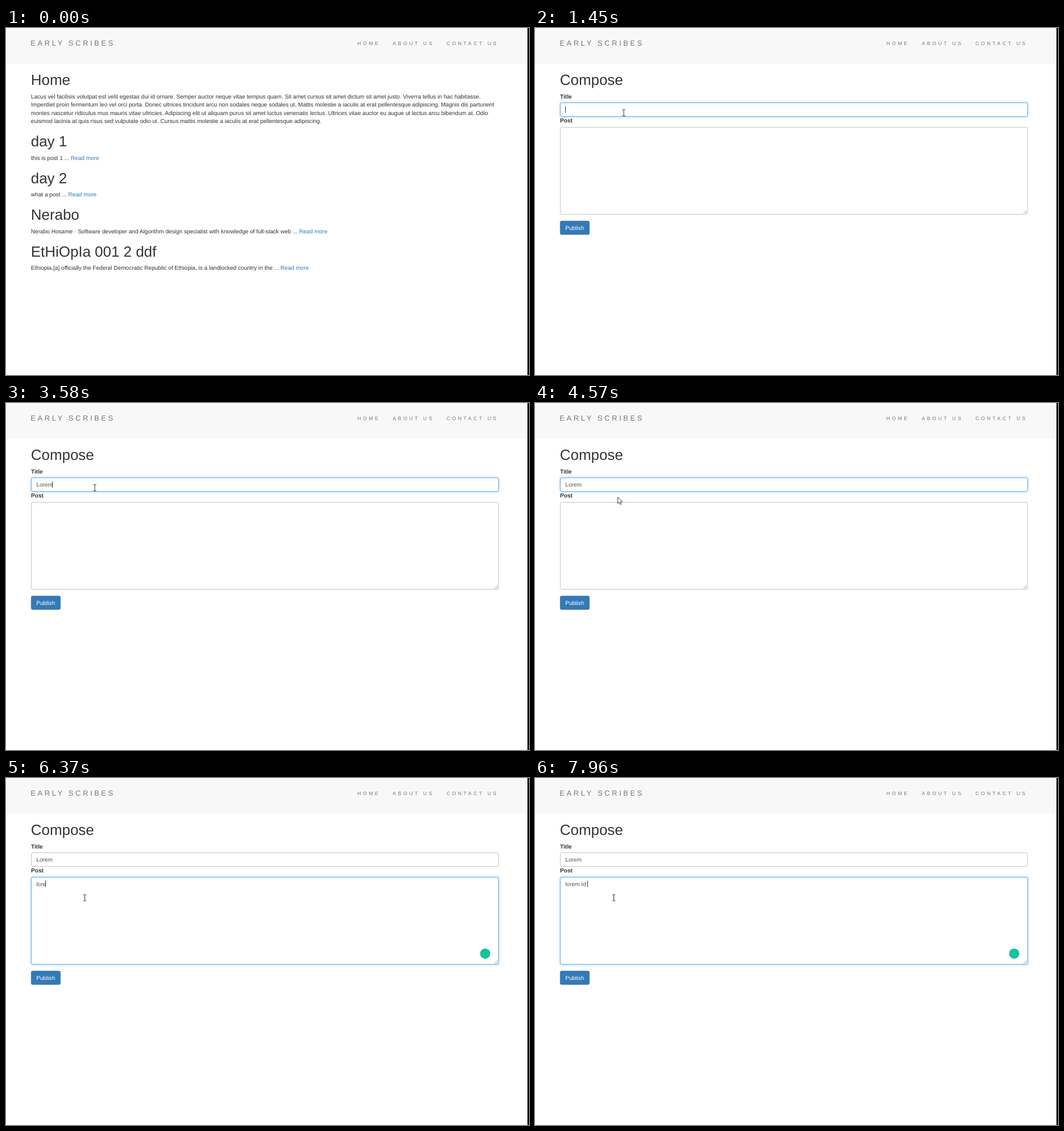
An HTML page for the animation above (8 s loop, 919 by 610 pixels).

```html
<!DOCTYPE html>
<html lang="en">
<head>
<meta charset="utf-8">
<title>Journal compose</title>
<style>
  html, body { margin: 0; width: 100%; height: 100%; overflow: hidden; background: #fff; }
  svg { display: block; width: 100%; height: 100%; }
  text {
    font-family: "Liberation Sans", Arial, sans-serif;
    font-size: 10.08px;
    fill: #333;
    white-space: pre;
    text-rendering: geometricPrecision;
  }
  .brand { font-size: 12.96px; letter-spacing: 3.6px; fill: #777; }
  .nav { font-size: 8.64px; letter-spacing: 3.6px; fill: #777; }
  .h1 { font-size: 25.92px; }
  .label { font-weight: bold; }
  .link { fill: #337ab7; }
  .value { fill: #555; }
  .field { fill: #fff; stroke: #c6c6c6; }
  .focus { fill: #fff; stroke: #66afe9; filter: drop-shadow(0 0 2.9px rgba(102, 175, 233, .6)); }
  .grip { stroke: #777; stroke-width: .8; }
  .popup rect { fill: #fff; filter: drop-shadow(0 1px 1.3px rgba(0, 0, 0, .32)); }
  .popup text { font-family: "Open Sans", "Noto Sans", sans-serif; font-size: 8.95px; }
</style>
</head>
<body>
<svg id="stage" viewBox="0 0 919 610">
  <rect width="919" height="610" fill="#fff"/>
  <rect width="916" height="62.6" fill="#f8f8f8"/>
  <text class="brand" x="43.3" y="31.1">EARLY SCRIBES</text>
  <text class="nav" x="617.4" y="29.7">HOME</text>
  <text class="nav" x="679.5" y="29.7">ABOUT US</text>
  <text class="nav" x="773.9" y="29.7">CONTACT US</text>

  <g id="home"></g>

  <g id="compose">
    <text class="h1" x="43.8" y="100.4">Compose</text>
    <rect class="field" x="44.5" y="131.5" width="821" height="24" rx="2.5"/>
    <rect class="field" x="44.5" y="174.5" width="821" height="153" rx="2.5"/>
    <rect class="focus" id="titleGlow" x="44.5" y="131.5" width="821" height="24" rx="2.5"/>
    <rect class="focus" id="postGlow" x="44.5" y="174.5" width="821" height="153" rx="2.5"/>
    <text class="label" x="44" y="123.9">Title</text>
    <text class="label" x="44" y="166.4">Post</text>
    <path class="grip" d="M858.3 326.3l5.6-5.6M861.6 326.3l2.3-2.3"/>
    <text class="value" id="titleText" x="53.3" y="147.1"></text>
    <text class="value" id="postText" x="53.3" y="189.6"></text>
    <rect id="titleCaret" y="138" width="1" height="11" fill="#333"/>
    <rect id="postCaret" y="180.5" width="1" height="11" fill="#333"/>
    <circle id="badge" cx="842" cy="308.7" r="9" fill="#15c39a"/>
    <rect x="44.3" y="339.3" width="51.2" height="23.8" rx="2.6" fill="#337ab7" stroke="#2e6da4" stroke-width=".72"/>
    <text x="53.2" y="354.9" fill="#fff" style="fill:#fff">Publish</text>
    <g class="popup" id="popup"><rect x="115" y="162" width="61" height="162" rx="1.5"/></g>
  </g>

  <path id="arrow" d="M0 0V11.4L2.6 9 4.4 13 6.1 12.2 4.4 8.4H8Z" fill="#fff" stroke="#111" stroke-width=".8"/>
  <path id="beam" d="M-2.6-5.4H-.7L0-4.8 .7-5.4H2.6M0-4.8V4.8M-2.6 5.4H-.7L0 4.8 .7 5.4H2.6" fill="none" stroke="#222" stroke-width=".95"/>
  <rect x="916.3" width="2.7" height="610" fill="#000"/>
</svg>
<script>
const LOOP = 8000, BLINK = 530;
const $ = id => document.getElementById(id);

function addText(parent, cls, x, y, str) {
  const el = document.createElementNS("http://www.w3.org/2000/svg", "text");
  el.setAttribute("class", cls);
  el.setAttribute("x", x);
  el.setAttribute("y", y);
  el.textContent = str;
  parent.appendChild(el);
  return el;
}

const intro = [
  "Lacus vel facilisis volutpat est velit egestas dui id ornare. Semper auctor neque vitae tempus quam. Sit amet cursus sit amet dictum sit amet justo. Viverra tellus in hac habitasse.",
  "Imperdiet proin fermentum leo vel orci porta. Donec ultrices tincidunt arcu non sodales neque sodales ut. Mattis molestie a iaculis at erat pellentesque adipiscing. Magnis dis parturient",
  "montes nascetur ridiculus mus mauris vitae ultricies. Adipiscing elit ut aliquam purus sit amet luctus venenatis lectus. Ultrices vitae auctor eu augue ut lectus arcu bibendum at. Odio",
  "euismod lacinia at quis risus sed vulputate odio ut. Cursus mattis molestie a iaculis at erat pellentesque adipiscing."
];
const posts = [
  ["day 1", "this is post 1"],
  ["day 2", "what a post"],
  ["Nerabo", "Nerabo Hosame · Software developer and Algorithm design specialist with knowledge of full-stack web"],
  ["EtHiOpIa 001 2 ddf", "Ethiopia,[a] officially the Federal Democratic Republic of Ethiopia, is a landlocked country in the"]
];

addText($("home"), "h1", 43.8, 100.4, "Home");
intro.forEach((line, i) => addText($("home"), "", 43.8, 123.9 + i * 14.4, line));
posts.forEach(([title, body], i) => {
  const y = 208.4 + i * 64.5;
  addText($("home"), "h1", 43.8, y, title);
  const line = addText($("home"), "", 43.8, y + 23.2, body + " ... ");
  const link = document.createElementNS(line.namespaceURI, "tspan");
  link.setAttribute("class", "link");
  link.textContent = "Read more";
  line.appendChild(link);
});
["day 1", "day 2", "Test", "post one", "one", "two"].forEach((s, i) =>
  addText($("popup"), "", 124, 181.7 + i * 26, s));

// Each entry restarts the caret blink and sets the field's text.
const titleKeys = [
  [1310, ""], [1840, ""], [2720, "L"], [2850, "Lo"],
  [3040, "Lor"], [3180, "Lore"], [3580, "Lorem"]
];
const postKeys = [
  [4840, ""], [6140, "l"], [6190, "lo"], [6300, "lor"], [6370, "lore"], [6630, "lorem"],
  [6900, "lorem "], [6960, "lorem I"], [7100, "lorem Id"], [7910, "lorem Id "]
];
const mouse = [
  [980, 152, 122], [1050, 152, 122], [1250, 156, 149], [4430, 156, 149],
  [4570, 145.5, 165.5], [4630, 145.5, 165.5], [4770, 138.5, 210.5]
];

const show = (id, on) => { $(id).style.display = on ? "" : "none"; };
const ramp = (t, start, span) => {
  const u = Math.min(1, Math.max(0, (t - start) / span));
  return u * u * (3 - 2 * u);
};

function drawField(name, keys, t, focused) {
  const last = keys.filter(k => k[0] <= t).pop();
  const text = $(name + "Text");
  const str = last ? last[1] : "";
  if (text.textContent !== str) text.textContent = str;
  const caretOn = focused && last && Math.floor((t - last[0]) / BLINK) % 2 === 0;
  show(name + "Caret", caretOn);
  if (caretOn) {
    const width = str ? text.getComputedTextLength() : 0;
    $(name + "Caret").setAttribute("x", Math.round(53 + width - .5));
  }
}

function mouseAt(t) {
  const i = mouse.findIndex(k => k[0] > t);
  if (i < 0) return mouse[mouse.length - 1].slice(1);
  const [t0, x0, y0] = mouse[i - 1], [t1, x1, y1] = mouse[i];
  const u = ramp(t, t0, t1 - t0);
  return [x0 + (x1 - x0) * u, y0 + (y1 - y0) * u];
}

function drawMouse(t) {
  const visible = t >= mouse[0][0];
  const [x, y] = visible ? mouseAt(t) : [0, 0];
  const overText = (y > 131 && y < 156) || y > 174;
  show("arrow", visible && !overText);
  show("beam", visible && overText);
  $(overText ? "beam" : "arrow").setAttribute("transform", `translate(${x} ${y})`);
}

function draw(t) {
  show("home", t < 580);
  show("compose", t >= 580);
  $("titleGlow").style.opacity = ramp(t, 1290, 150) - ramp(t, 4700, 140);
  $("postGlow").style.opacity = ramp(t, 4700, 140);
  drawField("title", titleKeys, t, t < 4700);
  drawField("post", postKeys, t, true);
  show("popup", t >= 1840 && t < 2785);
  $("badge").setAttribute("r", 9 * ramp(t, 5400, 150));
  drawMouse(t);
}

const start = performance.now();
function tick() {
  draw((performance.now() - start) % LOOP);
  requestAnimationFrame(tick);
}
tick();
</script>
</body>
</html>
```
